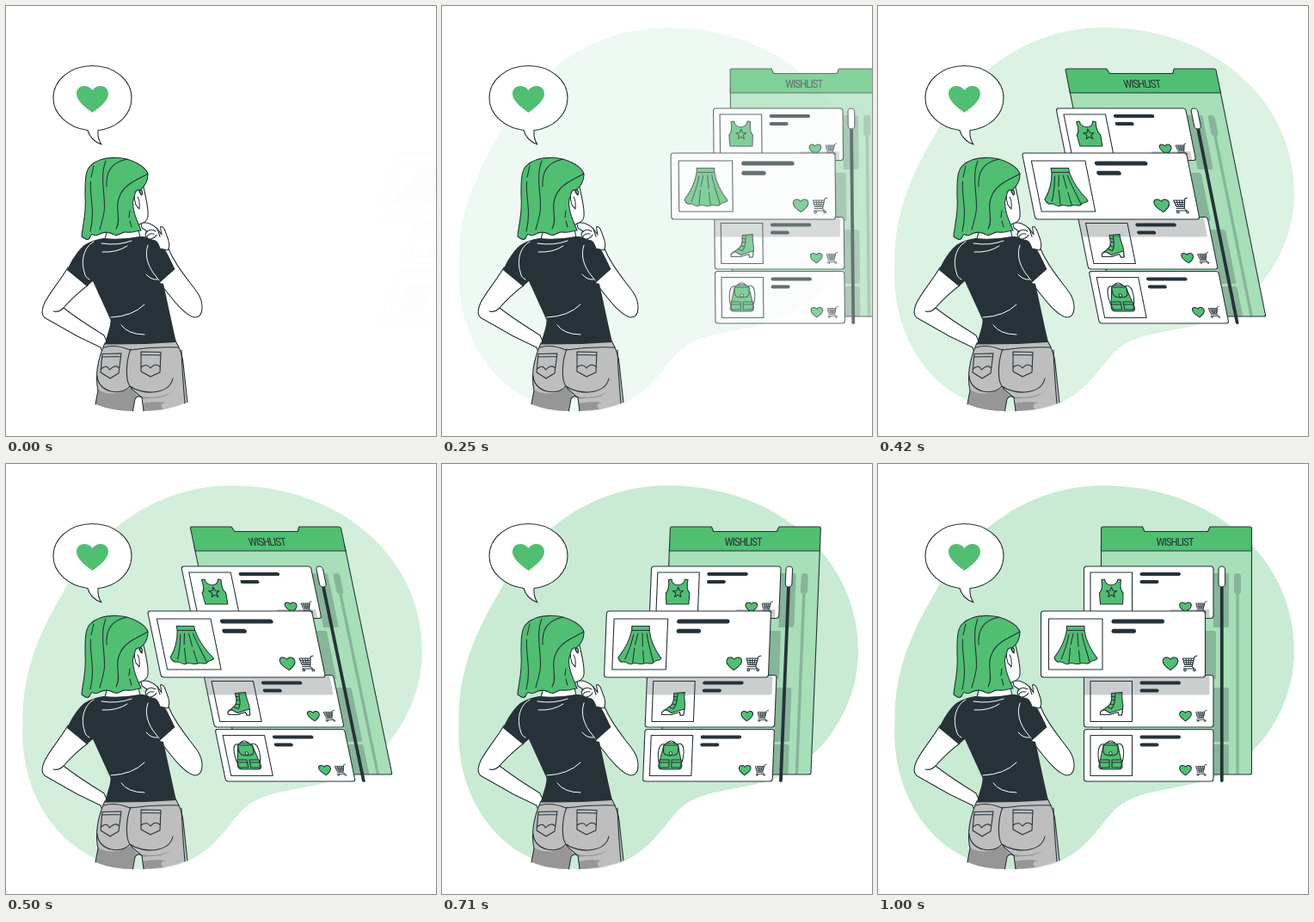
Animation, 500 px wide and 500 px high, one loop 1040 ms. Source, as an HTML page:

```html
<!DOCTYPE html>
<html lang="en">
<head>
<meta charset="utf-8">
<title>Wishlist</title>
<style>
  html, body { margin: 0; width: 100%; height: 100%; overflow: hidden; background: #fff; }
  svg { display: block; width: 100vw; height: 100vh; }
  .ink { stroke: #263238; stroke-width: 1.1; stroke-linecap: round; stroke-linejoin: round; }
  .line { fill: none; }
  .white { fill: #fff; }
  .green { fill: #50bf72; }
  .dark { fill: #263238; }
  .grey { fill: #bebebe; }
  .dusk { fill: #969696; }
  .shade { fill: #263238; opacity: .24; }
  .fold { fill: none; stroke: #fff; stroke-width: 1; stroke-linecap: round; }
  .bar { fill: none; stroke: #263238; stroke-linecap: round; }
  .title { font: 400 13px "Roboto Condensed", Roboto, "Open Sans", sans-serif; font-stretch: 75%; letter-spacing: -1px; fill: #263238; text-anchor: middle; }
</style>
</head>
<body>
<svg viewBox="0 0 500 500">
  <defs>
    <path id="heart" d="M0 16C-6.500 11.500-18.500 2.500-18.500-6C-18.500-16-5.500-18-0-10C5.500-18 18.500-16 18.500-6C18.500 2.500 6.500 11.500 0 16Z"/>
    <g id="cart" class="ink line">
      <path d="M8.500-9L5.500-8L2.800 3.500H-6.500M-8-6H5L3 1.500H-6ZM-7.300-3.500H4.300M-6.700-1H3.700M-4.500-6L-3.500 1.500M-1.300-6V1.500M2-6L.500 1.500M2.800 3.500L5 6H-7"/>
      <circle cx="-5.500" cy="7.500" r="1.300" class="white"/>
      <circle cx="5.500" cy="7.500" r="1.300" class="white"/>
    </g>
    <g id="card">
      <rect width="150.500" height="60.500" rx="3" class="ink white"/>
      <rect x="7.500" y="7" width="48.500" height="47" class="ink white"/>
      <path d="M67 9H110.500M67 18H85" class="bar" stroke-width="4"/>
      <use href="#heart" class="ink green" transform="translate(118 47.500) scale(.37)" style="stroke-width:2.800"/>
      <use href="#cart" transform="translate(136.500 47.500) scale(.74)"/>
    </g>
  </defs>

  <path id="blob" fill="#c9ebd4" opacity="0" d="M19.500 300C18 240 42 190 66 150C100 85 170 25 262 25C390 25 484 110 484 217C484 290 435 355 370 371C330 381 300 380 275 402C250 430 230 471 165 471C75 473 14 395 19.500 300Z"/>

  <g id="bubble">
    <path class="ink white" d="M107 144.500C129 142 146 127 146 107C146 86 126 69.500 100.500 69.500C75 69.500 55 86 55 107C55 126 73 142 95 144.500C97 152 103 158 111 161C107.500 156 106.500 150 107 144.500Z"/>
    <use href="#heart" class="green" x="100.500" y="108"/>
  </g>

  <g id="list" opacity="0">
    <g id="panel">
      <path class="ink" fill="#a7dfb8" d="M259.500 95H434.500V359Q434.500 361 432.500 361H261.500Q259.500 361 259.500 359Z"/>
      <g class="shade">
        <path d="M390 127H406Q408 127 408 129V188Q408 190 406 190H390ZM380 194H391Q393 194 393 196V250H380ZM390 260H406Q408 260 408 262V321Q408 323 406 323H390ZM390 326H406Q408 326 408 328V361H390Z"/>
        <path d="M414 131Q414 127 418 127Q422 127 422 131V147Q422 151 419.700 151V361H416.300V151Q414 151 414 147Z"/>
      </g>
      <path class="ink green" d="M259.500 101V75Q259.500 73 261.500 73H307.500L310 78.500H383.500L386 73H432.500Q434.500 73 434.500 75V101Z"/>
      <text x="345" y="95" class="title">WISHLIST</text>
      <path d="M399.800 125V368" class="bar" stroke-width="3.800"/>
      <rect x="396" y="119" width="7.600" height="24" rx="3.800" class="ink white"/>
    </g>

    <g id="top">
      <use href="#card" x="239.500" y="119"/>
      <path class="ink green" d="M260 134.500L263.500 134C264 143 278 143 279 134L282.500 134.500C281 143 282 147 285 150L284.500 163H258.500L257.500 150C261 147 261 142 260 134.500Z"/>
      <path class="ink line" d="M271.500 143L273.100 147.300L277.500 147.500L274 150.300L275.200 154.600L271.500 152.100L267.800 154.600L269 150.300L265.500 147.500L269.900 147.300Z"/>
      <path class="shade" d="M340 169H385.500V179.500H340Z"/>
    </g>

    <g id="boot">
      <use href="#card" x="239.500" y="245.500"/>
      <path class="ink green" d="M271.500 266.500L284 265.500C282.500 273 286 279 284.500 285L283.500 292H280L279 288L269 291.500H258.500C257 286 266 285 270 279C272 275 272 271 271.500 266.500Z"/>
      <path class="ink white" d="M258.500 291.500C257.500 287 261 286.500 264 286L269.500 289.500L279 286.500L284.500 285L283.500 292H280L279 288.500L269 291.500Z"/>
      <path class="ink line" d="M271 270L275 271M271.500 274L275.500 275M269.500 279L274 280M266.500 282.500L270 284M276 267C275 275 276 280 271 285"/>
      <path class="shade" d="M240 246H385.500V266Q385.500 268.500 383 268.500H240Z"/>
    </g>

    <g id="bag">
      <use href="#card" x="239.500" y="308.500"/>
      <path class="ink white" d="M263 326C256 324 255 336 257 347L261 348ZM278 326C286 322 287 336 284 347L280 348Z"/>
      <path class="ink green" d="M262 328Q263 324 270 324Q278 324 279 328L284 350Q285 355 279 355H262Q256 355 257 350Z"/>
      <path class="ink green" d="M262 327H279V334Q279 339 270.500 339Q262 339 262 334ZM258 344H269V353H260Q257 353 258 344ZM272 344H283Q284 353 281 353H272Z"/>
      <path class="ink line" d="M266 324Q270.500 320 275 324M258 347H269M272 347H283"/>
      <circle cx="270.500" cy="336.500" r="1.700" class="ink white"/>
    </g>

    <g id="skirt">
      <rect x="189.500" y="171" width="191" height="77" rx="3" class="ink white"/>
      <rect x="198.500" y="180" width="62.500" height="59" class="ink white"/>
      <path class="ink green" d="M219.500 193.500H240C242 207 248 217 255 226C253 230 249 227 246 231C242 234 239 230 235 232C230 234 226 230 222 232C218 235 215 229 211 230C208 231 206 228 205 225C212 216 217 207 219.500 193.500Z"/>
      <rect x="219.500" y="188.500" width="20.500" height="5" class="ink green"/>
      <path class="ink line" d="M222 198C220 208 217 218 213 227M227 197L224 210M223.500 214L222 231M232 197L233 212M233.500 217L235 231M237 197C239 208 243 219 246 230"/>
      <path d="M274 183H330.500M274 194.300H297.500" class="bar" stroke-width="5"/>
      <use href="#heart" class="ink green" style="stroke-width:2.300" transform="translate(340 232) scale(.475)"/>
      <use href="#cart" transform="translate(362.500 232)"/>
    </g>
  </g>

  <g id="woman">
    <path class="ink white" d="M72 304C64 318 51 333 45 345C41 354 41 360 46 363L83 384L110 397L113 405L118 392L114 383C100 374 82 363 67 351C72 345 85 332 95 325Z"/>
    <path class="ink line" d="M67 351C63 355 59 356 55 355"/>
    <path class="ink white" d="M188 280C194 295 202 306 214 322C222 332 228 339 228 350C228 360 223 364 216 361C203 355 190 336 178 321L190 302L178 280Z"/>
    <path class="ink white" d="M118 260L115 271Q135 273 156 269L154 260L147 248Z"/>
    <path class="ink white" d="M159 207C162 219 166 235 165 245C164 251 160 252 155 254L150 258L144 222Z"/>

    <path class="grey" d="M115 391Q156 394 197.500 390C202 398 205 405 206 415L211 461Q187 471 160 471L158 455Q153 452 150 457L147.500 471Q124 471 104 463L107 449C103 428 107 410 115 391Z"/>
    <path class="dusk" d="M107 446Q123 456 145 444L152 453L150 457L147.500 471Q124 471 104 463Z"/>
    <path class="dusk" d="M157 454C171 456 184 455 193 448Q184 457 168 456L158 457ZM159 462Q172 459 186 461Q177 463 183 469L160 471Z"/>
    <path class="ink line" d="M115 392C107 410 103 428 107 447L104 463M147.500 471L150 457Q153 452 158 455L160 471M197.500 390C202 398 205 405 206 415L211 461"/>
    <path class="ink line" d="M114 397Q128 393 144 400Q172 396 201 397M145 399C139 414 139 435 144 442C148 449 153 450 157 455M106 430C107 450 135 454 144 442M144 442C159 453 190 452 194 433M204 400Q205 428 208 462"/>
    <g class="ink line">
      <path d="M112 404.500L134 404L131 427L121 433L110 426ZM112 408L133.500 407.500M110.500 422Q117 416 120.500 423Q127 416 131.500 421"/>
      <path d="M157 402L180 402.500L179 426L168 431L157 425ZM157 405.500L180 406M157 420Q164 415 168 421Q174 414 179.500 420"/>
    </g>

    <path class="dark" d="M113 270Q135 272 155 268C166 268 175 270 180 276C187 285 192 297 196.500 306L178.500 322L183 323C188 345 193 370 198 391Q157 394 115 393.500C117 383 122 373 121.500 365L101 320L94 326L71 307C76 296 82 286 91 278Q100 272 113 270Z"/>
    <path class="fold" d="M111 276Q130 279 146 273M112 286Q129 287 141 279M102 274C88 282 88 300 91 309Q92 316 97 318M165 278C161 290 165 301 171 310L178 319M163 312Q169 319 176 318M122 362Q147 361 161 347M134 371Q142 382 161 382"/>

    <path class="ink white" d="M157 253C163 250 171 254 176 259L181 266L179.500 257C183 255 185 261 187 267C190 274 191 280 188 284L179 282C177 275 174 272 170 272C163 271 160 266 164 262L158 258Z"/>
    <path class="ink line" d="M163 263Q168 258 174 262M164 268Q166 264 172 265M168 271Q173 270 175 266M176 259L179 268"/>

    <path class="ink green" d="M97 187C105 178 118 176 129 176.500C148 177 164 188 165 196C165 203 162 209 156 214C150 219 146 224 148 234C149 244 154 253 157 261C152 261 148 264 140 263C133 262 133 268 126 266C118 261 112 263 107 266C101 269 101 262 98 268C96 274 92 271 88 268C88 260 94 242 92 220C92 205 92 193 97 187Z"/>
    <path class="ink white" d="M155 214C149 213 148 224 151 231Q153 234 155 236Q156 226 153 222"/>
    <path class="ink green" d="M155 214Q160 213 158 220Q155 218 155 214Z"/>
    <path class="ink line" d="M102 186L99 199M98.500 204C97 222 104 238 98 262M116 180C108 200 117 225 114 240Q112 250 109 260M141 178C122 182 116 193 117 210M165 195C151 203 139 207 133 219C125 235 135 247 128 259M144 238L143 246M144 250L146 257"/>
  </g>
</svg>
<script>
  const LOOP = 1040, FPS = 24, LEAD = 34;
  const blob = document.getElementById('blob');
  const list = document.getElementById('list');
  const slope = deg => Math.tan(deg * Math.PI / 180);
  const keys = [
    { at: 0, x: 250, skew: slope(-20), opacity: 0 },
    { at: 600, x: 0, skew: slope(10), opacity: 1 },
    { at: 800, x: 0, skew: slope(-2), opacity: 1 },
    { at: 1000, x: 0, skew: 0, opacity: 1 }
  ];

  const cubic = (s, a, b) => 3 * (1 - s) ** 2 * s * a + 3 * (1 - s) * s * s * b + s ** 3;

  // cubic-bezier(.36, -.01, .5, 1.38)
  function ease(u) {
    if (u <= 0 || u >= 1) return u <= 0 ? 0 : 1;
    let lo = 0, hi = 1;
    for (let i = 0; i < 24; i++) {
      const mid = (lo + hi) / 2;
      if (cubic(mid, .36, .5) < u) lo = mid; else hi = mid;
    }
    return cubic(lo, -.01, 1.38);
  }

  // Motion runs in 24 fps steps on a 10 ms grid; the opening step is held twice.
  function stepTime(t) {
    let n = Math.floor(t * FPS / 1000) + 1;
    while (Math.round(n * 100 / FPS) * 10 > t) n--;
    return (n < 2 ? 0 : n * 1000 / FPS) + LEAD;
  }

  function pose(t) {
    const i = t < 600 ? 0 : t < 800 ? 1 : 2;
    const a = keys[i], b = keys[i + 1];
    const p = ease((t - a.at) / (b.at - a.at));
    const mix = k => a[k] + (b[k] - a[k]) * p;
    return { x: mix('x'), skew: mix('skew'), opacity: mix('opacity') };
  }

  const clamp = v => Math.min(1, Math.max(0, v));

  function draw() {
    const t = stepTime(performance.now() % LOOP);
    const { x, skew, opacity } = pose(t);
    list.setAttribute('transform', `matrix(1 0 ${skew} 1 ${x - skew * 221.5} 0)`);
    list.setAttribute('opacity', clamp(opacity));
    blob.setAttribute('opacity', clamp(ease(t / 1000)));
    requestAnimationFrame(draw);
  }
  draw();
</script>
</body>
</html>
```
